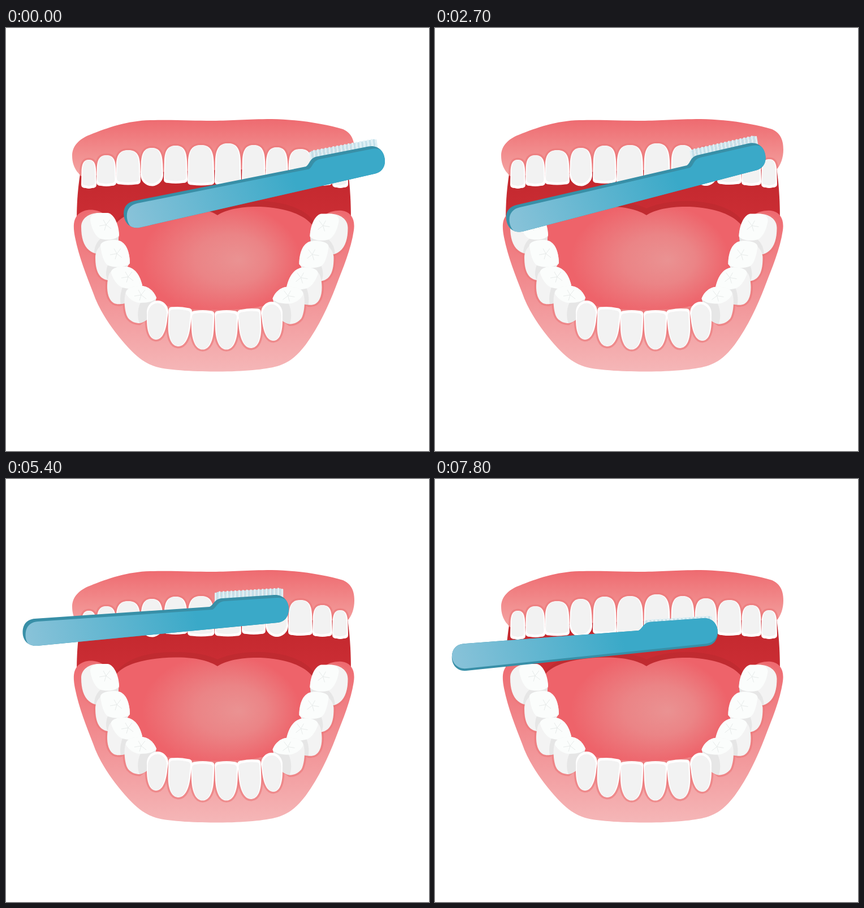
These frames come from a looping animation (748x748 px, 8.1 s). An HTML page:

```html
<!DOCTYPE html>
<html lang="en">
<head>
<meta charset="utf-8">
<title>Brushing teeth</title>
<style>
html, body { margin: 0; width: 100%; height: 100%; overflow: hidden; background: #fff; }
svg { display: block; width: 100vw; height: 100vh; }
.halo { fill: none; stroke: #ec7779; stroke-opacity: .6; stroke-width: 7; stroke-linejoin: round; }
</style>
</head>
<body>
<svg viewBox="0 0 748 748">
  <defs>
    <linearGradient id="upperFill" gradientUnits="userSpaceOnUse" x1="0" y1="162" x2="0" y2="262">
      <stop offset="0" stop-color="#ee6b70"/><stop offset="1" stop-color="#f4a5a3"/>
    </linearGradient>
    <linearGradient id="lowerFill" gradientUnits="userSpaceOnUse" x1="0" y1="320" x2="0" y2="606">
      <stop offset="0" stop-color="#ee696f"/><stop offset="1" stop-color="#f5b6b7"/>
    </linearGradient>
    <linearGradient id="throat" gradientUnits="userSpaceOnUse" x1="0" y1="260" x2="0" y2="345">
      <stop offset="0" stop-color="#c3282e"/><stop offset="1" stop-color="#cc2e35"/>
    </linearGradient>
    <radialGradient id="tongue" gradientUnits="userSpaceOnUse" cx="380" cy="408" r="140" fx="412" fy="412"
      gradientTransform="translate(0 122) scale(1 .7)">
      <stop offset="0" stop-color="#ea9292"/><stop offset=".45" stop-color="#eb8486"/><stop offset="1" stop-color="#ee636a"/>
    </radialGradient>
    <linearGradient id="handle" gradientUnits="userSpaceOnUse" x1="30" y1="295" x2="330" y2="230">
      <stop offset="0" stop-color="#8ac3d9"/><stop offset="1" stop-color="#3aa9c8"/>
    </linearGradient>
    <path id="body" d="M29.500 271C29.500 256 38 248 51 247L360 226C368 222 368 212 382 211L474 205C490 204 500 215 500 230C500 244 492 253 480 254L55 295C40 296 29.500 286 29.500 271Z"/>
    <path id="upperGum" d="M133 262C122 252 117 240 117 226C117 208 130 196 148 189C180 176 215 164 255 163C300 162 330 164 365 164C400 164 425 161 470 161C520 162 565 170 596 179C612 186 616 200 616 215C616 230 611 243 604 250Q370 246 133 262Z"/>
    <path id="lowerGum" d="M172 328C160 320 140 318 127 330C118 340 119 354 122 370C129 405 142 437 154 468C165 500 187 533 217 566C233 583 248 594 265 599C290 606 340 607.500 375 607.500C420 607.500 458 604 480 598C503 591 516 578 530 560C552 530 570 492 583 458C596 424 610 392 615 358C618 338 610 325 594 323C582 322 572 325 565 330L540 400L480 485H260L200 400Z"/>
    <clipPath id="bodyClip"><use href="#body"/></clipPath>
    <clipPath id="upperClip"><use href="#upperGum"/></clipPath>
    <clipPath id="lowerClip"><use href="#lowerGum"/></clipPath>
  </defs>

  <path fill="url(#throat)" d="M134 240C128 275 125 300 125 345L200 420H540L610 345C610 300 608 275 603 240Z"/>
  <path fill="#bb2a30" fill-opacity=".6" d="M190 350C205 318 250 305 300 306C335 306 360 312 374 319C390 311 420 305 450 306C500 307 540 325 548 350Z"/>
  <use href="#upperGum" fill="url(#upperFill)"/>
  <use href="#lowerGum" fill="url(#lowerFill)"/>
  <g class="halo" clip-path="url(#upperClip)" id="upperHalo"></g>
  <g class="halo" clip-path="url(#lowerClip)" id="lowerHalo"></g>
  <path fill="url(#tongue)" d="M190 354C200 327 250 316 300 315.500C335 315 360 322 374 331C390 320 420 315 450 316C490 318 526 328 542 349C540 395 515 450 482 482C450 504 290 504 258 482C225 450 196 400 190 354Z"/>
  <g id="teeth"></g>
  <g id="brush">
    <g id="bristles"></g>
    <use href="#body" fill="#388fa7"/>
    <g clip-path="url(#bodyClip)"><use id="face" href="#body" fill="url(#handle)"/></g>
  </g>
</svg>
<script>
const $ = id => document.getElementById(id);
const draw = (d, fill) => `<path d="${d}" fill="${fill}"/>`;

// Gum end at y0, biting edge at y1; lower teeth run upwards and have rounder gum ends.
function toothPath(x0, x1, y0, y1, pointed) {
  const w = x1 - x0, h = y1 - y0, s = Math.sign(h), cx = (x0 + x1) / 2;
  const [reach, bend, flat] = s > 0 ? [.42, .1, .2] : [.58, .2, .22];
  const side = y0 + h * reach, edge = y1 - s * (pointed ? 20 : 7);
  const bite = pointed
    ? `C${x1} ${y1 - s * 8} ${cx + w * .25} ${y1} ${cx} ${y1}S${x0} ${y1 - s * 8} ${x0} ${edge}`
    : `Q${x1} ${y1 - s} ${x1 - 8} ${y1 - s}Q${cx} ${y1 + s} ${x0 + 8} ${y1 - s}Q${x0} ${y1 - s} ${x0} ${edge}`;
  return `M${x0} ${edge}L${x0 + w * .02} ${side}C${x0 + w * .04} ${y0 + h * bend} ${x0 + w * flat} ${y0} ${cx} ${y0}` +
    `S${x1 - w * .04} ${y0 + h * bend} ${x1 - w * .02} ${side}L${x1} ${edge}${bite}Z`;
}

function addTooth(halo, x0, x1, y0, y1, pointed, tilt = 0) {
  const s = Math.sign(y1 - y0), outer = toothPath(x0, x1, y0, y1, pointed);
  const wrap = inner => `<g transform="rotate(${tilt} ${(x0 + x1) / 2} ${(y0 + y1) / 2})">${inner}</g>`;
  halos[halo] += wrap(`<path d="${outer}"/>`);
  teeth += wrap(draw(outer, '#fff') +
    draw(toothPath(x0 + 2, x1 - 2.5, y0 + s * .5, y1 - s * 4.5, pointed), '#f2f2f2'));
}

// body, shaded side, chewing face, centre of the grooves
const molars = [
  ['M165 327C146 327 133 337 133 352C133 370 137 385 147 393C155 400 162 399 168 397L198 376L200 366C198 345 190 327 165 327Z',
   'M168 372C160 378 156 388 156 398C166 400 184 392 199 376V366Z',
   'M165 327C155 327 148 332 149 340C151 352 156 368 168 373C180 376 195 374 200 367C200 350 192 329 180 327Z', 177, 348],
  ['M190 375C172 376 158 390 158 405C158 425 162 443 180 446L213 424L219 416C219 395 210 374 190 375Z',
   'M180 419C176 430 176 440 180 446C196 445 209 436 214 420Z',
   'M195 375C180 374 166 378 167 386C169 400 173 416 181 420C191 424 212 424 219 416C219 395 212 376 195 375Z', 196, 399],
  ['M212 422C196 421 183 428 181 440C178 452 178 468 183 478C188 488 196 489 203 488L234 466L241 455C237 438 228 423 212 422Z',
   'M206 458C202 470 201 480 203 488C216 488 230 480 236 458Z',
   'M212 422C196 421 184 426 186 434C190 445 197 456 206 459C222 463 240 462 241 455C237 438 228 423 212 422Z', 216, 440],
  ['M238 456C222 456 212 461 211 470C208 482 210 505 216 513C222 520 230 522 236 522L258 505L266 477C262 466 252 456 238 456Z',
   'M238 485C232 498 232 512 236 522C250 520 260 508 264 480Z',
   'M238 456C222 456 211 462 212 470C218 480 228 486 238 486C250 486 262 484 266 477C262 466 252 456 238 456Z', 239, 472],
];

const mirror = inner => `<g transform="translate(737.5 1.5) scale(-1 1)">${inner}</g>`;
const grooves = (x, y) =>
  `<path fill="none" stroke="#e7ebea" d="M${x - 12} ${y + 2}L${x} ${y}L${x + 7} ${y - 9}M${x - 5} ${y - 9}L${x} ${y}L${x + 9} ${y + 7}M${x} ${y}L${x - 3} ${y + 10}"/>`;

const halos = { upper: '', lower: '' };
let teeth = '';

[[133, 160, 233, 284], [160, 195, 225, 280], [194, 238, 216, 277.5], [238, 278, 212, 279.5, 1],
 [279, 321, 208, 275], [321, 368.5, 207, 278.5], [369, 416, 204, 278.5], [417, 459, 207, 275],
 [459, 499, 211, 279, 1], [499, 542, 214, 277], [542, 577, 223, 279], [577, 605, 232, 283]]
  .forEach(t => addTooth('upper', ...t));

const molarArt = molars.map(([body, shade, face, x, y]) =>
  draw(body, '#f3f3f3') + draw(shade, '#e6e6e6') + draw(face, '#fbfdfc') + grooves(x, y)).join('');
const molarHalo = molars.map(m => `<path d="${m[0]}"/>`).join('');
halos.lower += molarHalo + mirror(molarHalo);
teeth += molarArt + mirror(molarArt);

[[248, 286, 551, 482, 1, 4], [285.5, 327, 563, 493, 0, 4], [327, 368.5, 568.5, 499],
 [369, 410.5, 568.5, 499], [411, 452.5, 566, 496, 0, -4], [452, 490, 553, 484, 1, -4]]
  .forEach(t => addTooth('lower', ...t));

$('upperHalo').innerHTML = halos.upper;
$('lowerHalo').innerHTML = halos.lower;
$('teeth').innerHTML = teeth;

let hairs = '';
for (let i = 0; i < 35; i++) {
  const x = 369 + i * 3.46;
  const y = 199 - i * .2 + (i % 2) + (i === 0 || i === 34 ? 2 : 0);
  hairs += `<rect x="${x}" y="${y}" width="3.600" height="20" rx="1.200" fill="${i % 2 ? '#c3e0ea' : '#dff0f5'}"/>`;
}
$('bristles').innerHTML = hairs;

const STEP = 300;
// head tip x, y, turn, sideways slide in the middle of a stroke
const places = [[670, 233, -7.4, -22], [584.5, 226.5, -9.2, 0], [500, 232, 0, 58]];
// drop, roll offset of the lit face, bristle sink, extra turn, slide weight
const strokes = [
  { drop: 0, fx: 5, fy: 5, sink: 0, turn: 0, slide: 0 },
  { drop: 22, fx: 0, fy: 0, sink: 5, turn: -.2, slide: 1 },
  { drop: 41, fx: 0, fy: -4, sink: 8, turn: -.4, slide: 0 },
];

function pose(k) {
  const [x, y, turn, slide] = places[Math.floor(k / 9)], s = strokes[k % 3];
  $('brush').setAttribute('transform',
    `translate(${x + slide * s.slide} ${y + s.drop}) rotate(${turn + s.turn}) translate(-500 -232)`);
  $('face').setAttribute('transform', `translate(${s.fx} ${s.fy})`);
  $('bristles').setAttribute('transform', `translate(0 ${s.sink})`);
}

const start = performance.now();
function tick() {
  pose(Math.floor((performance.now() - start) / STEP) % 27);
  requestAnimationFrame(tick);
}
tick();
</script>
</body>
</html>
```
